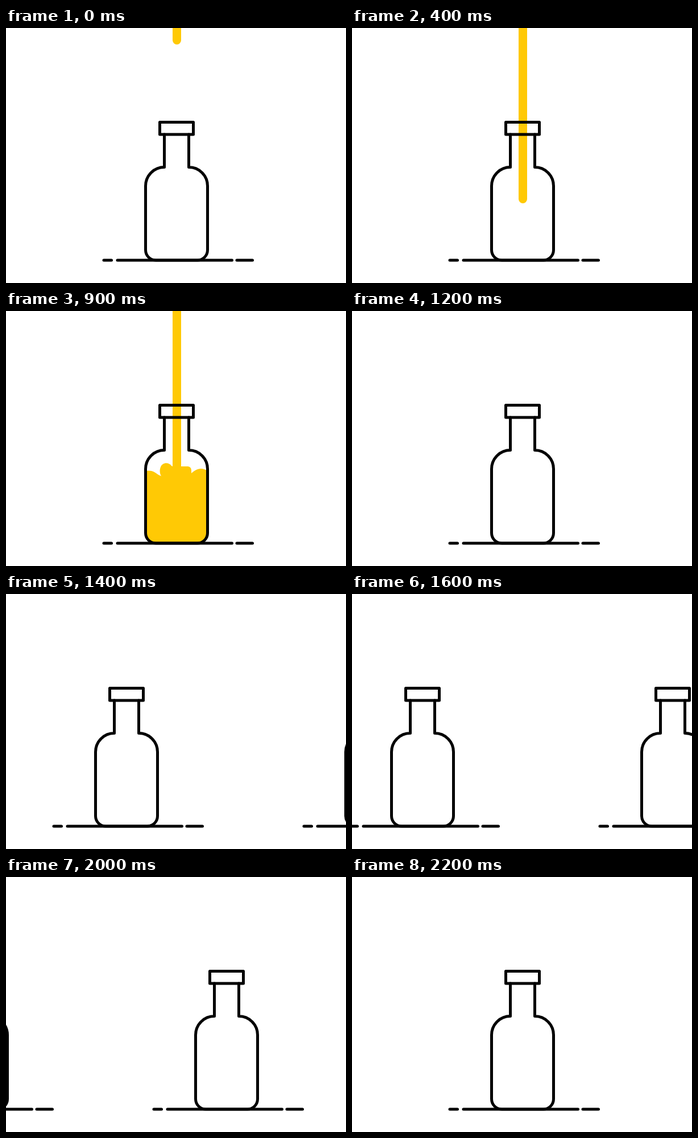
An HTML page that plays this animation: 598x448 px, repeating every 2.3 s.

```html
<!DOCTYPE html>
<html lang="en">
<head>
<meta charset="utf-8">
<title>Filling bottles</title>
<style>
  html, body { margin: 0; width: 100%; height: 100%; overflow: hidden; background: #fff; }
  svg { display: block; }
</style>
</head>
<body>
<svg width="598" height="448" viewBox="0 0 598 448">
  <defs>
    <path id="body" d="M278.5 187V244.5A33 33 0 0 0 245.5 277.5V390A18 18 0 0 0 263.5 408H336.5A18 18 0 0 0 354.5 390V277.5A33 33 0 0 0 321.5 244.5V187"/>
    <clipPath id="inside"><use href="#body"/></clipPath>
    <g id="bottle" fill="none" stroke="#000" stroke-width="5" stroke-linecap="round" stroke-linejoin="round">
      <use href="#body"/>
      <path d="M270.5 165.5H329.5V187H270.5ZM172 408H185.5M196 408H397.5M406 408H433.5"/>
    </g>
  </defs>
  <path id="stream" stroke="#ffc905" stroke-width="15" stroke-linecap="round"/>
  <g clip-path="url(#inside)">
    <!-- liquid with its surface near y = 0 -->
    <path id="liquid" fill="#ffc905" d="M240 3C249 -1 258 0 264 5Q269 9 273 10C270 5 270 -1 272 -6C275 -14 286 -15 291 -8L293 -7H320Q326 -6 326 0V5C331 1 336 -3 343 -3Q350 -3 360 4V240H240Z"/>
  </g>
  <g id="belt">
    <use href="#bottle"/>
    <use href="#bottle" x="440"/>
  </g>
</svg>
<script>
  const LOOP = 2300, STEP = 100, POUR_END = 1200, SPACING = 440;
  const [stream, liquid, belt] = ['stream', 'liquid', 'belt'].map(id => document.getElementById(id));
  const start = performance.now();

  function draw(now) {
    const step = Math.floor(Math.max(0, now - start) % LOOP / STEP);
    const t = step * STEP;
    const pouring = t < POUR_END;
    const level = 408 - Math.max(0, t - 500) * 0.32;
    const tip = Math.min(21.5 + t * 0.6975, level - 3);

    stream.style.display = pouring ? '' : 'none';
    stream.setAttribute('d', `M300.5 -20V${tip}`);

    // the splash flips sides on every step
    liquid.style.display = pouring && t > 500 ? '' : 'none';
    liquid.setAttribute('transform', step % 2
      ? `translate(0 ${level})`
      : `translate(600 ${level}) scale(-1 1)`);

    const shift = Math.max(0, t - POUR_END) / 1000 * SPACING;
    belt.setAttribute('transform', `translate(${-shift} 0)`);
    requestAnimationFrame(draw);
  }
  draw(start);
</script>
</body>
</html>
```
